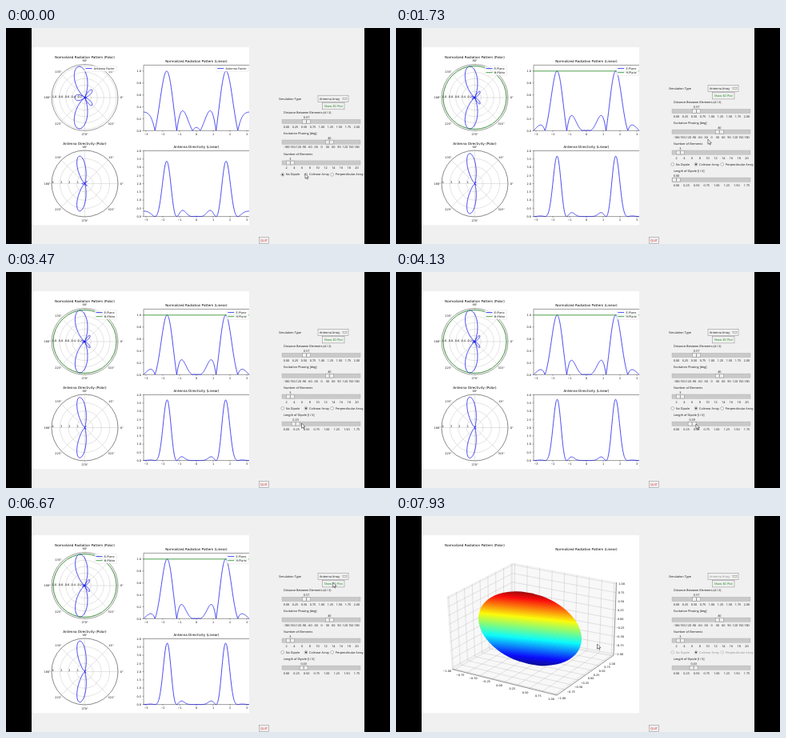
Recreate the animation shown at these times as an HTML page. Size 480 by 270 pixels, loop 8000 ms.

```html
<!DOCTYPE html>
<html lang="en">
<head>
<meta charset="utf-8">
<title>Antenna pattern explorer</title>
<style>
html, body { margin: 0; width: 100%; height: 100%; overflow: hidden; background: #000; }
svg { display: block; width: 480px; height: 270px; }
text { font: 3.76px "Open Sans", sans-serif; text-anchor: middle; fill: #111; text-rendering: geometricPrecision; }
.tick { font: 3.43px "DejaVu Sans", sans-serif; }
.title { font: 4.11px "DejaVu Sans", sans-serif; fill: #000; }
.l { text-anchor: start; }
.r { text-anchor: end; }
.line { fill: none; stroke-width: .75; stroke-linejoin: round; }
.e { stroke: #1010ee; }
.h { stroke: #108010; }
.axis { fill: none; stroke: #222; stroke-width: .45; }
.grid { fill: none; stroke: #b0b0b0; stroke-width: .35; }
.legend { fill: #fff; fill-opacity: .8; stroke: #ccc; stroke-width: .3; }
.knob, .button { fill: #f0f0f0; stroke: #8a8a8a; stroke-width: .5; }
.trough { fill: #c9c9c9; stroke: #aaa; stroke-width: .4; }
.radio { fill: #fff; stroke: #777; stroke-width: .5; }
.off text.dim { fill: #8c8c8c; }
.off .radio { fill: #f0f0f0; stroke: #aaa; }
#show { fill: #108010; }
.down #show { fill: #111; }
.down #button { stroke: #333; stroke-width: .7; }
.quit { fill: #e01818; }
</style>
</head>
<body>
<svg id="stage" viewBox="0 0 480 270"></svg>
<script>
const LOOP = 8000, PI = Math.PI;
const PICKED = 800, PRESSED = 7070, SOLID = 7800;
const stage = document.getElementById('stage');
const $ = id => document.getElementById(id);
const range = n => [...Array(n).keys()];

const text = (x, y, s, cls = '', id = '') =>
  `<text x="${x}" y="${y + 1.3}" class="${cls}" id="${id}">${s}</text>`;
const rect = (x, y, w, h, cls, extra = '') =>
  `<rect x="${x}" y="${y}" width="${w}" height="${h}" class="${cls}" ${extra}/>`;
const path = (d, cls, id = '') => `<path d="${d}" class="${cls}" id="${id}"/>`;
const circle = (x, y, r, cls, id = '') =>
  `<circle cx="${x}" cy="${y}" r="${r}" class="${cls}" id="${id}"/>`;

// Plot geometry
const PX = 98.5, RIM = 41.5;
const rows = [
  { py: 87, rmax: 1.05, rstep: .2, rn: 5, top: 46.4, base: 128.3, ymax: 1.1, ystep: .2, yn: 6 },
  { py: 194.5, rmax: 4, rstep: 1, rn: 4, top: 153.5, base: 235.6, ymax: 4, ystep: .5, yn: 9 }
];

function polarAxes({ py, rmax, rstep, rn }, i) {
  let s = range(rn).map(k => circle(PX, py, RIM * rstep * (k + 1) / rmax, 'grid')).join('');
  for (let k = 0; k < 8; k++) {
    const c = Math.cos(k * PI / 4), d = Math.sin(k * PI / 4);
    s += path(`M${PX} ${py}l${RIM * c} ${-RIM * d}`, 'grid');
    s += text(PX + 46.8 * c + (k ? 0 : -.6), py - 46 * d, k * 45 + '°', 'tick');
  }
  return s + circle(PX, py, RIM, 'axis');
}

const polarLabels = ({ py, rmax, rstep, rn }, i) => range(rn).map(k => {
  const v = rstep * (k + 1);
  return text(PX + 1.6 - RIM * v / rmax, py - 1.4, i ? v : v.toFixed(1), 'tick');
}).join('');

function linearAxes({ top, base, ymax, ystep, yn }) {
  let s = path(`M304 ${top}H172V${base}H304`, 'axis');
  for (let k = 0; k < yn; k++) {
    const y = base - (base - top) * k * ystep / ymax;
    s += path(`M172 ${y}h-1.3`, 'axis') + text(169, y, (k * ystep).toFixed(1), 'tick r');
  }
  for (let k = -3; k <= 3; k++) {
    const x = 238 + 21 * k;
    s += path(`M${x} ${base}v1.3`, 'axis') + text(x, base + 4.3, String(k).replace('-', '−'), 'tick');
  }
  return s;
}

function legend(right, names) {
  const w = names.length > 1 ? 27.5 : 40.5, x = right - w;
  return rect(x, 47.6, w, 1.5 + 5.1 * names.length, 'legend', 'rx=".6"') + names.map((n, i) => {
    const y = 50.6 + 5.1 * i;
    return path(`M${x + 1.5} ${y}h8`, 'line ' + 'eh'[i]) + text(x + 11.8, y, n, 'tick l');
  }).join('');
}
const legends = names => legend(138.5, names) + legend(303.2, names);

// Radiation pattern: three-element array, optionally times a dipole of length len
function pattern(dipole, len) {
  const kd = 2 * PI * .57, phase = 40 * PI / 180;
  const field = a => {
    const psi = kd * Math.cos(a) + phase, s = Math.sin(a);
    const af = Math.abs(1 + 2 * Math.cos(psi)) / 3;
    if (!dipole) return af;
    if (Math.abs(s) < 1e-6) return 0;
    const k = PI * Math.max(len, .01);
    return af * Math.abs((Math.cos(k * Math.cos(a)) - Math.cos(k)) / s);
  };
  const n = 360, v = range(n + 1).map(i => field(-PI + 2 * PI * i / n));
  const peak = Math.max(...v);
  const norm = v.map(x => x / peak);
  const power = norm.reduce((s, x, i) => s + x * x * Math.abs(Math.sin(2 * PI * i / n)), 0) * PI / n;
  return [norm, norm.map(x => 2 * x * x / power)];
}

function drawCurves(dipole, len) {
  pattern(dipole, len).forEach((v, i) => {
    const { py, rmax, top, base, ymax } = rows[i], n = v.length - 1;
    const join = f => 'M' + v.map((x, k) => f(x, -PI + 2 * PI * k / n).map(c => c.toFixed(2))).join('L');
    $('polar' + i).setAttribute('d', join((x, a) =>
      [PX + RIM * x / rmax * Math.cos(a), py - RIM * x / rmax * Math.sin(a)]));
    $('linear' + i).setAttribute('d', join((x, a) => [238 + 21 * a, base - (base - top) * x / ymax]));
  });
}

const plots = () => {
  const unit = rows[0].base - (rows[0].base - rows[0].top) / 1.1;
  return rows.map(polarAxes).join('') + rows.map(linearAxes).join('') +
    range(2).map(i => path('', 'line e', 'polar' + i) + path('', 'line e', 'linear' + i)).join('') +
    `<g id="hplane">${circle(PX, 87, RIM / 1.05, 'line h')}${path(`M172 ${unit}H304`, 'line h')}</g>` +
    rows.map(polarLabels).join('') +
    `<g id="one">${legends(['Antenna Factor'])}</g><g id="two">${legends(['E-Plane', 'H-Plane'])}</g>` +
    text(PX, 144.3, 'Antenna Directivity (Polar)', 'title') +
    text(238, 148.5, 'Antenna Directivity (Linear)', 'title');
};

// 3D view
const mix = (a, b, f) => [a[0] + (b[0] - a[0]) * f, a[1] + (b[1] - a[1]) * f];
function pane(a, b, c, d) {
  let s = `<path d="M${[a, b, c, d].join('L')}Z" fill="#f8f8f8" stroke="#ddd" stroke-width=".4"/>`;
  for (let i = 0; i < 9; i++) {
    const f = .02 + .12 * i;
    s += path(`M${mix(a, b, f)}L${mix(d, c, f)}M${mix(a, d, f)}L${mix(b, c, f)}`, 'grid');
  }
  return s;
}
const scale3 = (a, b) => range(9).map(i => {
  const [x, y] = mix(a, b, i / 8);
  return text(x, y, (i / 4 - 1).toFixed(2).replace('-', '−'), 'tick');
}).join('');

function solid() {
  const back = [146, 59], left = [64, 101], right = [275.5, 83];
  const lowBack = [145, 150], lowLeft = [70, 191.5], lowRight = [272, 174], front = [201, 224];
  const jet = [[0, '#800000'], [.11, '#f00'], [.36, '#ff0'], [.5, '#7dff7a'],
    [.64, '#0ff'], [.88, '#00f'], [1, '#000080']];
  const tilt = 'transform="translate(167.5 140.7) rotate(19.7)"';
  return `<defs><linearGradient id="jet" gradientUnits="userSpaceOnUse" x1="172" y1="94" x2="163" y2="187">` +
    jet.map(([o, c]) => `<stop offset="${o}" stop-color="${c}"/>`).join('') + `</linearGradient>
    <pattern id="mesh" width="2" height="1.6" patternUnits="userSpaceOnUse" patternTransform="rotate(14)">
    <circle cx=".6" cy=".6" r=".4" fill="#fff" opacity=".3"/><circle cx="1.6" cy="1.3" r=".35" opacity=".2"/></pattern>
    <clipPath id="body"><ellipse rx="66.7" ry="43.2" ${tilt}/></clipPath></defs>` +
    pane(left, back, lowBack, lowLeft) + pane(back, right, lowRight, lowBack) +
    pane(lowLeft, lowBack, lowRight, front) +
    path(`M${lowLeft}L${front}L${lowRight}L${right}`, 'axis') +
    `<g clip-path="url(#body)">${rect(100, 90, 135, 100, '', 'fill="url(#jet)"')}` +
    `${rect(100, 90, 135, 100, '', 'fill="url(#mesh)"')}</g>` +
    scale3([64, 194], [194, 229]) + scale3([279, 172.5], [282, 84.5]) +
    [207, 218.5, 228, 236, 243.5, 250.5, 257.5, 264, 270].map((x, i) =>
      text(x, 228 - 43 * (x - 207) / 63, (i / 4 - 1).toFixed(2).replace('-', '−'), 'tick')).join('');
}

// Controls
function slider(id, y, label, ticks, f, value) {
  const x = 350.5 + 88 * f;
  return text(347, y - 11.1, label, 'l') + rect(345, y - 2.6, 98, 5.2, 'trough') +
    `<g id="${id}" transform="translate(${x} ${y})">${rect(-5, -2.4, 10, 4.8, 'knob')}` +
    `${path('M0 -2V2', 'axis')}${text(0, -5.3, value, '', id + 'Value')}</g>` +
    ticks.map((s, i) => text(350.5 + 88 * i / (ticks.length - 1), y + 6.6, s)).join('');
}
const fixed = (n, step) => range(n).map(i => (i * step).toFixed(2));
const radio = (x, s, id) => circle(x, 170.4, 1.9, 'radio', id) + text(x + 4.1, 170.3, s, 'l dim');

const controls = () =>
  text(341, 75.6, 'Simulation Type', 'l') +
  rect(390, 71.3, 38, 8.2, 'button') + text(392, 75.5, 'Antenna Array', 'l dim') +
  rect(421, 74.6, 5, 1.8, 'button') +
  rect(395.5, 80.3, 27.5, 8.6, 'button', 'id="button"') + text(409.3, 84.6, 'Show 3D Plot', '', 'show') +
  slider('dist', 104, 'Distance Between Elements (d / λ)', fixed(9, .25), .285, '0.57') +
  slider('phase', 129.7, 'Excitation Phasing [deg]', range(13).map(i => i * 30 - 180), 220 / 360, 40) +
  slider('count', 155.6, 'Number of Elements', range(10).map(i => 2 * i + 2), 1 / 18, 3) +
  radio(345.7, 'No Dipole') + radio(375, 'Colinear Array', 'colinear') + radio(407.7, 'Perpendicular Array') +
  circle(345.7, 170.4, .9, '', 'dot') +
  `<g id="lengthRow">${slider('len', 189.7, 'Length of Dipole [l / λ]', fixed(8, .25), 0, '0.00')}</g>`;

stage.innerHTML =
  rect(32, 0, 416, 270, '', 'fill="#f0f0f0"') + rect(32, 24, 272, 222.3, '', 'fill="#fff"') +
  `<g id="plots">${plots()}</g><g id="solid">${solid()}</g>` +
  text(PX, 37, 'Normalized Radiation Pattern (Polar)', 'title') +
  text(238, 41.2, 'Normalized Radiation Pattern (Linear)', 'title') +
  `<g id="controls">${controls()}</g>` +
  rect(316.5, 261.3, 11.8, 8.4, 'button') + text(322.4, 265.5, 'QUIT', 'quit') +
  `<path id="cursor" d="M0 0V6.2L1.5 4.9L2.5 7L3.4 6.6L2.5 4.6H4.4Z" fill="#fff" stroke="#111" stroke-width=".5"/>`;

// Motion: [time, ...values]
const pointer = [[0, 374, 182], [1000, 374, 182], [1730, 390, 139], [2330, 354, 188], [2530, 354, 189],
  [3470, 369.5, 189], [4130, 375, 190], [4870, 376, 190], [5400, 376, 190], [5870, 373.5, 178],
  [6200, 409, 83], [7350, 408, 83], [7530, 362.5, 101.5], [7870, 251.5, 160], [LOOP, 251.5, 160]];
const lengths = [[0, 0], [2500, 0], [3450, .23], [4130, .39], [4270, .39], [4400, .42],
  [4800, .42], [4870, .43], [LOOP, .43]];

function at(keys, t) {
  const i = keys.findIndex(k => k[0] > t), a = keys[i - 1], b = keys[i];
  const f = (t - a[0]) / (b[0] - a[0]);
  return a.slice(1).map((v, k) => v + (b[k + 1] - v) * f);
}
const show = (id, on) => $(id).setAttribute('display', on ? 'inline' : 'none');

let drawn = '';
function frame(now) {
  const t = now % LOOP, dipole = t >= PICKED, in3d = t >= SOLID;
  const len = Math.floor(at(lengths, t)[0] * 100 + 1e-6) / 100;
  const key = dipole + ' ' + len;
  if (key !== drawn) {
    drawn = key;
    drawCurves(dipole, len);
    $('len').setAttribute('transform', `translate(${350.5 + 88 * len / 1.75} 189.7)`);
    $('lenValue').textContent = len.toFixed(2);
  }
  show('plots', !in3d);
  show('solid', in3d);
  show('one', !dipole);
  for (const id of ['two', 'hplane', 'lengthRow']) show(id, dipole);
  $('dot').setAttribute('cx', dipole ? 375 : 345.7);
  $('colinear').style.fill = t >= 530 && t < 600 ? '#ccc' : '';
  $('controls').setAttribute('transform', `translate(0 ${dipole ? 0 : 12.9})`);
  $('controls').setAttribute('class', in3d ? 'off' : t >= PRESSED ? 'down' : '');
  $('cursor').setAttribute('transform', `translate(${at(pointer, t)})`);
  requestAnimationFrame(() => frame(performance.now()));
}
frame(performance.now());
</script>
</body>
</html>
```
